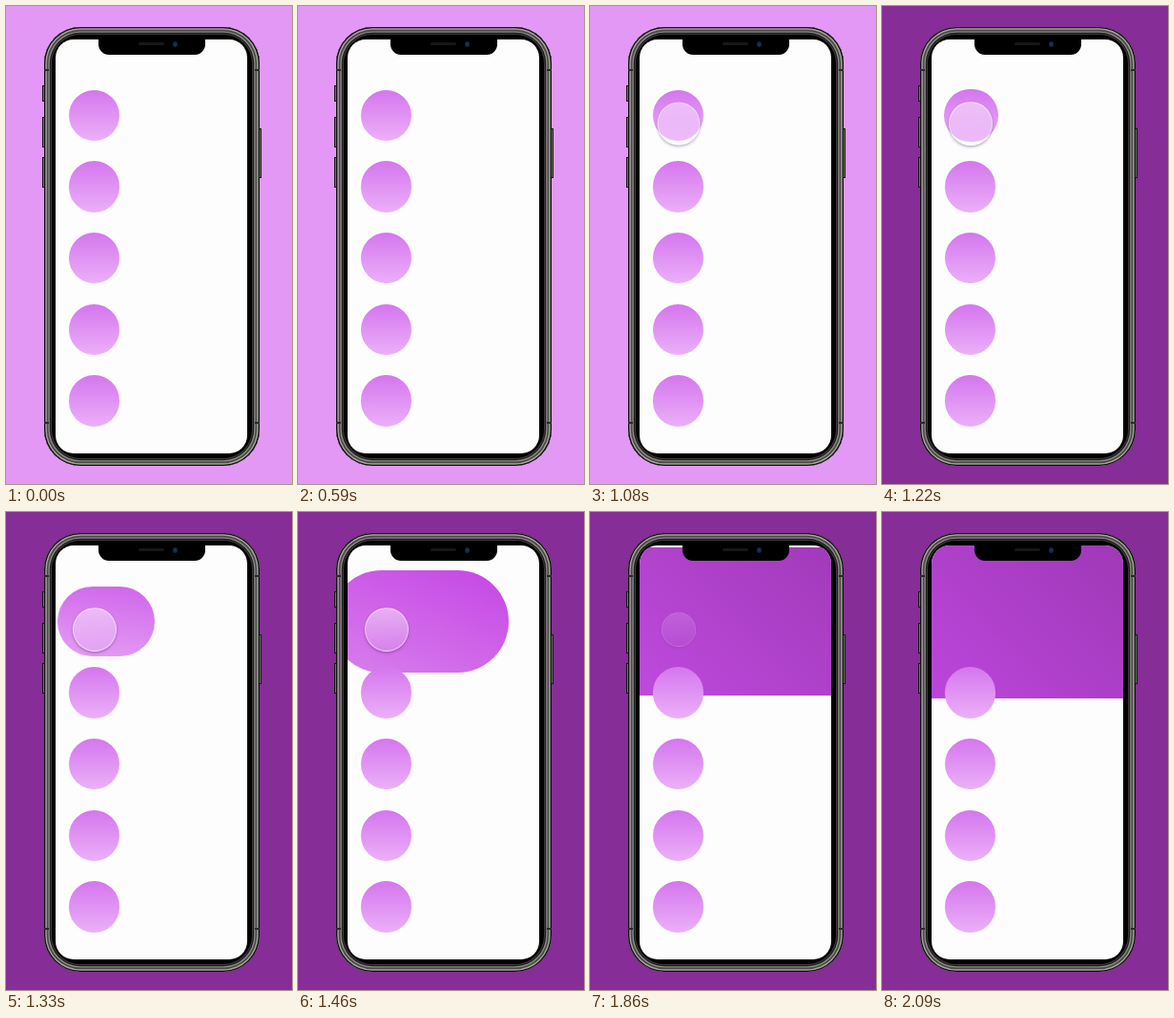
An HTML page that plays this animation: 300 px wide and 500 px high, repeating every 2.86 s.

```html
<!DOCTYPE html>
<html lang="en">
<head>
<meta charset="utf-8">
<title>Expanding card</title>
<style>
html, body { margin: 0; width: 100%; height: 100%; overflow: hidden; }
#stage { position: relative; width: 300px; height: 500px; overflow: hidden; }
#stage * { position: absolute; box-sizing: border-box; }

.phone {
  left: 39.5px; top: 21.5px; width: 226.5px; height: 459px;
  border-radius: 38px; background: #000;
  box-shadow: inset 0 0 0 1.3px #0c0c0c, inset 0 0 0 2.8px #a5a29f,
    inset 0 0 0 4.4px #4a4846, inset 0 0 0 5.8px #8d8985,
    inset 0 0 0 7px #1c1c1c, inset 0 0 0 8px #3c3b3a;
}
.button { width: 3px; background: #77736f; border: 1px solid #151515; }
.antenna { width: 5px; height: 2px; background: #2b2a29; }
.screen {
  left: 52.3px; top: 34.5px; width: 200.4px; height: 433px;
  border-radius: 19px; background: #fdfdfd; overflow: hidden;
}
.dot {
  left: 13.6px; width: 53.4px; height: 53.4px; border-radius: 50%;
  background: linear-gradient(#d576ee, #ebb0f8);
}
.notch {
  left: 96.5px; top: 33px; width: 112px; height: 17.5px;
  border-radius: 0 0 11px 11px; background: #000;
}
.speaker { left: 139px; top: 37.5px; width: 27px; height: 3.5px; border-radius: 2px; background: #171717; }
.camera {
  left: 174.5px; top: 37px; width: 5.5px; height: 5.5px; border-radius: 50%;
  background: radial-gradient(#1d3a63, #0b1424);
}
#touch {
  left: 70px; top: 100px; width: 46px; height: 46px; border-radius: 50%;
  background: linear-gradient(rgba(255,255,255,.5), rgba(255,255,255,.12));
  border: 1.5px solid rgba(255,255,255,.5);
  box-shadow: 0 1.5px 3px rgba(70,40,80,.4);
}
#cursor { left: 0; top: 0; overflow: visible; }
</style>
</head>
<body>
<div id="stage">
  <div id="buttons"></div>
  <div class="phone"></div>
  <div id="antennas"></div>
  <div class="screen" id="screen"><div id="card"></div></div>
  <div class="notch"></div>
  <div class="speaker"></div>
  <div class="camera"></div>
  <div id="touch"></div>
  <svg id="cursor" width="12" height="19">
    <path d="M0 0V15.5L3.6 12.2L6.2 18L8.8 16.9L6.3 11.2H11Z" fill="#000" stroke="#fff" stroke-width="1"/>
  </svg>
</div>
<script>
const LOOP = 2860;
const $ = id => document.getElementById(id);
const stage = $('stage'), card = $('card'), touch = $('touch'), cursor = $('cursor');

function add(parent, className, style) {
  const el = document.createElement('div');
  el.className = className;
  Object.assign(el.style, style);
  parent.append(el);
}

for (const [x, y, h] of [[37.5, 83, 17], [37.5, 116, 32], [37.5, 158, 32], [265, 128, 52]])
  add($('buttons'), 'button', { left: x + 'px', top: y + 'px', height: h + 'px' });
for (const x of [39.5, 261])
  for (const y of [66, 434.5])
    add($('antennas'), 'antenna', { left: x + 'px', top: y + 'px' });
for (let i = 1; i < 5; i++)
  add($('screen'), 'dot', { top: 53.3 + 74.65 * i + 'px' });

const clamp = v => Math.min(1, Math.max(0, v));
const span = (t, start, length) => clamp((t - start) / length);
const mix = (a, b, k) => a + (b - a) * k;

// The CSS "ease" curve: cubic-bezier(.25, .1, .25, 1)
function ease(x) {
  const bezier = (a, b, u) => 3 * a * u * (1 - u) ** 2 + 3 * b * u * u * (1 - u) + u ** 3;
  let lo = 0, hi = 1;
  for (let i = 0; i < 24; i++) {
    const mid = (lo + hi) / 2;
    if (bezier(.25, .25, mid) < x) lo = mid; else hi = mid;
  }
  return bezier(.1, 1, (lo + hi) / 2);
}

// Colours of the card when closed, half open and open
const DARK = [[213, 118, 238], [198, 70, 230], [154, 54, 176]];
const LIGHT = [[235, 176, 248], [216, 128, 236], [191, 72, 224]];
function blend(stops, p) {
  const i = p < .5 ? 0 : 1;
  return `rgb(${stops[i].map((c, n) => mix(c, stops[i + 1][n], p * 2 - i))})`;
}

function drawCard(p) {
  const left = mix(13.6, -50, p), right = mix(67, 267, p);
  const height = mix(53.4, 160, p);
  Object.assign(card.style, {
    left: left + 'px',
    top: 80 - height / 2 + 'px',
    width: right - left + 'px',
    height: height + 'px',
    borderRadius: Math.min(height / 2, 167 * (1 - p)) + 'px',
    background: `linear-gradient(${180 + 45 * p}deg, ${blend(DARK, p)}, ${blend(LIGHT, p)})`
  });
}

function draw(t) {
  stage.style.background = t < 1220 ? '#e398f6' : '#862d98';
  drawCard(t < 1220 ? 0 : ease(span(t, 1200, 880)));

  const move = Math.sin(span(t, 592, 398) * Math.PI / 2);
  cursor.style.transform = `translate(${mix(-13, 92, move)}px, ${mix(81, 122, move)}px)`;
  cursor.style.opacity = t < 590 ? 0 : 1 - span(t, 960, 60);

  const press = span(t, 960, 130) * (1 - span(t, 1770, 130));
  touch.style.opacity = press;
  touch.style.transform = `scale(${mix(.7, 1, press)})`;
}

function frame() {
  draw(performance.now() % LOOP);
  requestAnimationFrame(frame);
}
frame();
</script>
</body>
</html>
```
